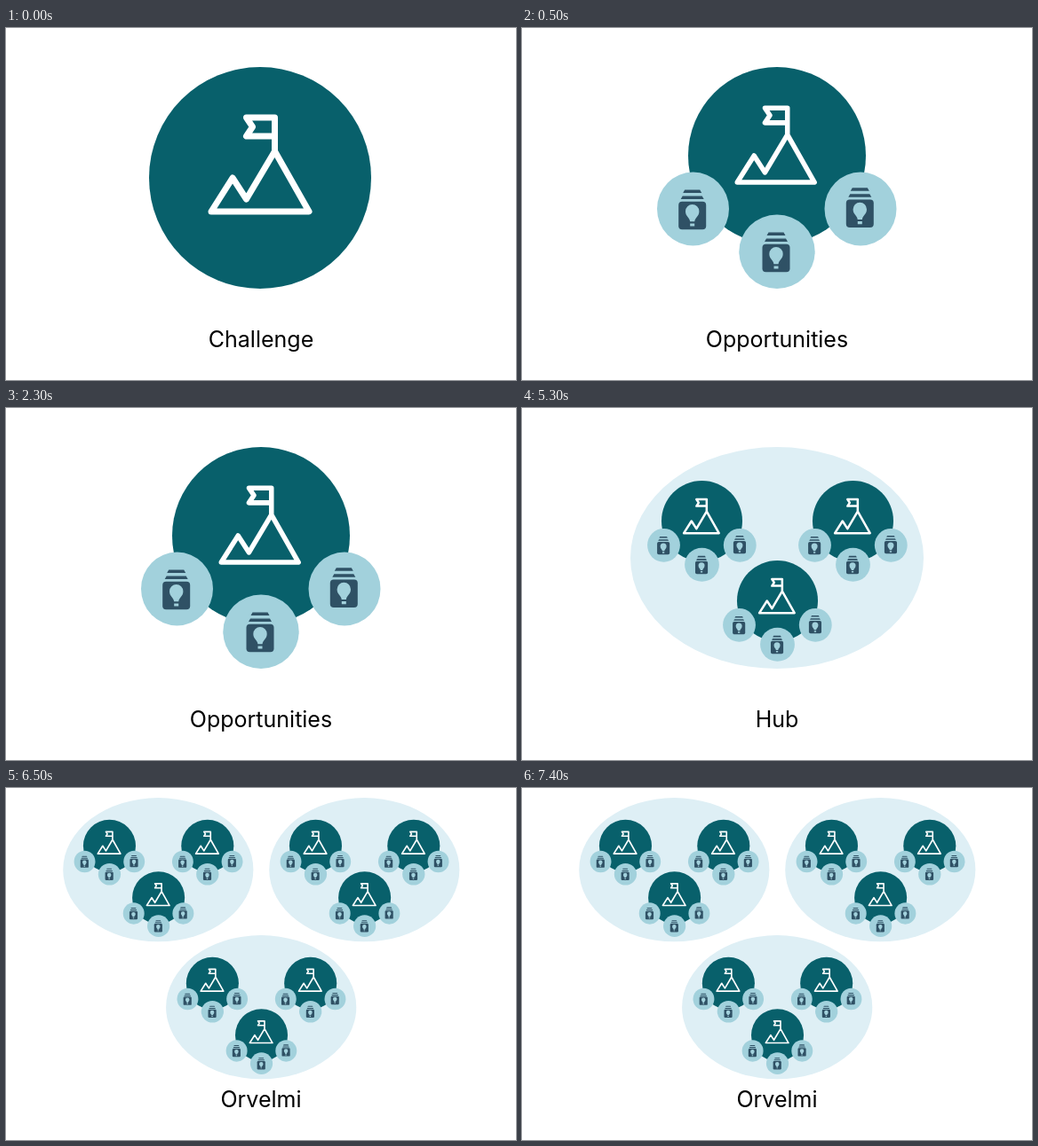
These frames come from a looping animation (574 px wide and 397 px high, 8000 ms). An HTML page:

```html
<!DOCTYPE html>
<html lang="en">
<head>
<meta charset="utf-8">
<title>From challenge to platform</title>
<style>
  html, body { margin: 0; width: 100%; height: 100%; overflow: hidden; background: #fff; }
  svg { display: block; width: 100vw; height: 100vh; }
  .scene { visibility: hidden; }
  .peak { fill: none; stroke: #fff; stroke-width: 7; stroke-linecap: round; stroke-linejoin: round; }
  .deep { fill: #08606b; }
  .soft { fill: #a2d1dc; }
  .pale { fill: #deeff5; }
  .ink { fill: #2f5165; }
  text { font: 25px Inter, sans-serif; text-anchor: middle; fill: #000; }
</style>
</head>
<body>
<svg viewBox="0 0 574 397">
  <defs>
    <!-- each symbol is centred on its own origin -->
    <path id="peak" class="peak" d="M-55 38L-31 0L-15.5 24L16.5-30L55 38ZM16.5-30V-68H-15.5L-8.5-57.5L-15.5-47H16.5"/>
    <g id="card">
      <path class="ink" d="M-8.5-21.5H8.5L10.5-18H-10.5ZM-11-14.5H11L13-11H-13Z"/>
      <rect class="ink" x="-15.5" y="-8.3" width="31" height="31.5" rx="4"/>
      <path class="soft" d="M-2.6 14.2C-2.8 10-7.7 8.5-7.7 2.7A7.7 7.7 0 0 1 7.7 2.7C7.7 8.5 2.8 10 2.6 14.2ZM-2.5 16.4H2.5V19.6H-2.5Z"/>
    </g>
    <g id="challenge">
      <circle class="deep" r="100"/>
      <use href="#peak" transform="translate(-1.3) scale(.79)"/>
      <ellipse class="soft" cx="-94.5" cy="60" rx="40.5" ry="41.5"/>
      <ellipse class="soft" cy="108.3" rx="42.7" ry="41.7"/>
      <ellipse class="soft" cx="94" cy="60" rx="40.5" ry="41.5"/>
      <use href="#card" x="-95.3" y="60"/>
      <use href="#card" x="-1" y="108"/>
      <use href="#card" x="93.3" y="57.7"/>
    </g>
    <g id="hub">
      <ellipse class="pale" rx="165" ry="125"/>
      <use href="#challenge" transform="translate(-84.5 -41.5) scale(.455)"/>
      <use href="#challenge" transform="translate(85.5 -41.5) scale(.455)"/>
      <use href="#challenge" transform="translate(.5 48.5) scale(.455)"/>
    </g>
  </defs>

  <g class="scene">
    <circle class="deep" cx="286" cy="169" r="125"/>
    <use href="#peak" x="286" y="169"/>
    <text x="287" y="360">Challenge</text>
  </g>
  <g class="scene">
    <use href="#challenge" x="287" y="144"/>
    <text x="287" y="360">Opportunities</text>
  </g>
  <g class="scene">
    <use href="#hub" x="287" y="169"/>
    <text x="287" y="360">Hub</text>
  </g>
  <g class="scene">
    <use href="#hub" transform="translate(171.3 92.2) scale(.649)"/>
    <use href="#hub" transform="translate(403.3 92.2) scale(.649)"/>
    <use href="#hub" transform="translate(287.2 247.2) scale(.649)"/>
    <text x="287" y="360">Orvelmi</text>
  </g>
</svg>
<script>
  const LOOP = 8000;
  const starts = [0, 500, 3500, 6500];
  const scenes = document.querySelectorAll('.scene');

  function draw() {
    const t = performance.now() % LOOP;
    const current = starts.filter(s => s <= t).length - 1;
    scenes.forEach((scene, i) => {
      scene.style.visibility = i === current ? 'visible' : 'hidden';
    });
    requestAnimationFrame(draw);
  }
  draw();
</script>
</body>
</html>
```
